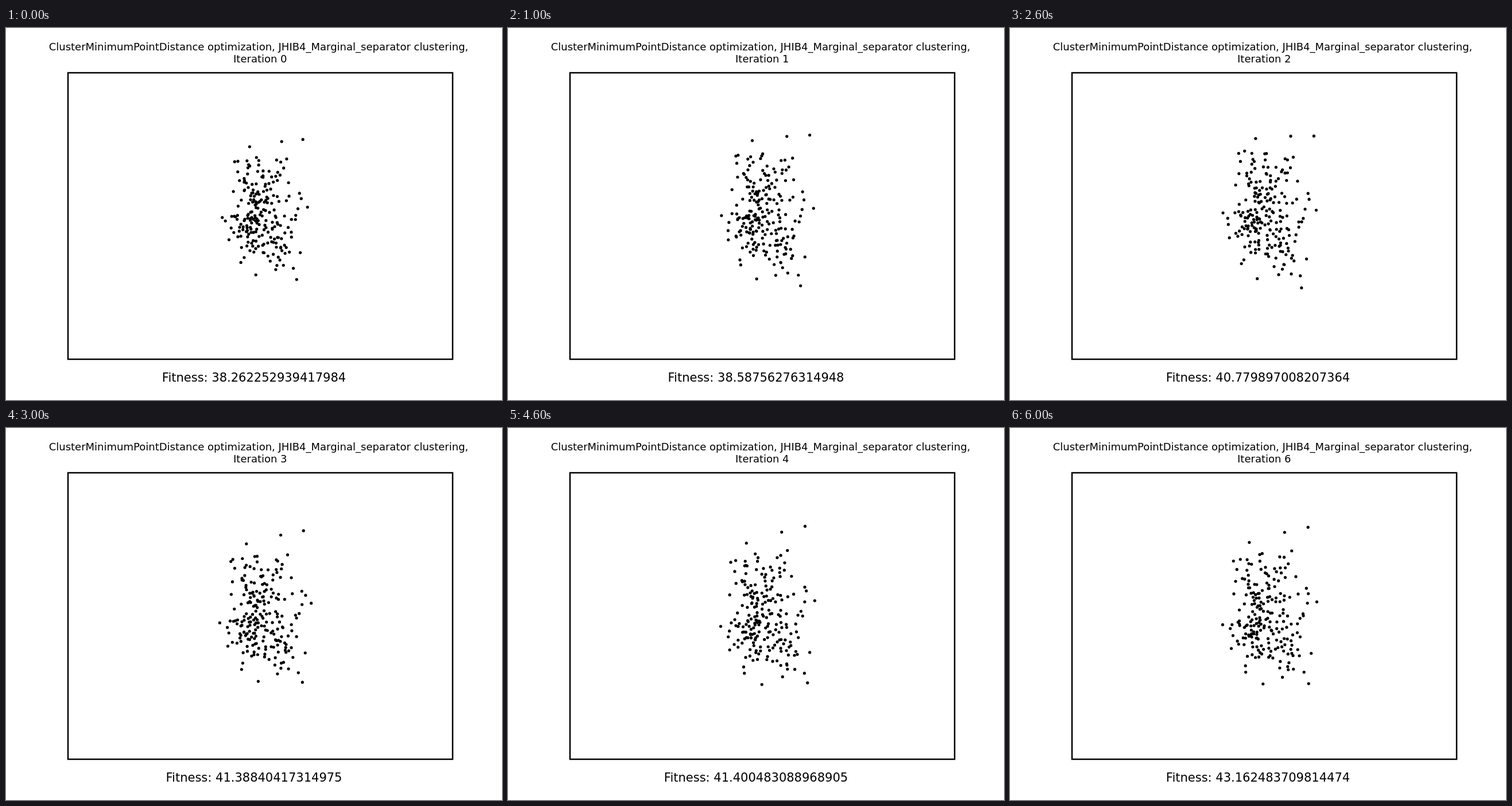
Animation of 864 by 648 pixels, one loop 7 s. Source, as an HTML page with a canvas:

```html
<!DOCTYPE html>
<html lang="en">
<head>
<meta charset="utf-8">
<title>Cluster optimization</title>
<style>
  html, body { margin: 0; width: 864px; height: 648px; overflow: hidden; background: #fff; }
  canvas { display: block; }
</style>
</head>
<body>
<canvas id="stage" width="864" height="648"></canvas>
<script>
const ctx = document.getElementById('stage').getContext('2d');
const STEP = 1000;
const COUNT = 212;
const CENTER = [437, 322];

const steps = [
  { fitness: '38.262252939417984', turn: 0, size: .9 },
  { fitness: '38.58756276314948', turn: .04, size: .97 },
  { fitness: '40.779897008207364', turn: .09, size: .98 },
  { fitness: '41.38840417314975', turn: -.09, size: .97 },
  { fitness: '41.400483088968905', turn: -.15, size: 1 },
  { fitness: '41.86884283091664', turn: 0, size: 1 },
  { fitness: '43.162483709814474', turn: -.12, size: 1 }
];

// Outermost points, clockwise; the rest of the cloud lies inside them
const outline = [
  [423, 194], [485, 184], [526, 180], [535, 311], [521, 399], [514, 451],
  [435, 442], [406, 418], [383, 374], [370, 331], [394, 223]
];

function makeRandom(seed) {
  return () => {
    seed = (seed + 0x6D2B79F5) | 0;
    let t = Math.imul(seed ^ (seed >>> 15), 1 | seed);
    t = (t + Math.imul(t ^ (t >>> 7), 61 | t)) ^ t;
    return ((t ^ (t >>> 14)) >>> 0) / 4294967296;
  };
}

const random = makeRandom(37);
const rayleigh = () => Math.sqrt(-2 * Math.log(1 - random()));
const gauss = () => rayleigh() * Math.cos(2 * Math.PI * random());
const mix = (a, b, t) => a.map((v, i) => v + (b[i] - v) * t);

// Random points, dense at the center and thinning out towards the outline
function makeCloud() {
  const cloud = [...outline];
  while (cloud.length < COUNT) {
    const k = Math.floor(random() * outline.length);
    const edge = mix(outline[k], outline[(k + 1) % outline.length], random());
    const reach = .37 * rayleigh();
    const [x, y] = mix(CENTER, edge, reach);
    const crowded = cloud.some(p => Math.hypot(p[0] - x, p[1] - y) < 3.5);
    if (reach < .97 && !crowded) cloud.push([x, y]);
  }
  return cloud;
}

// Scale and tilt the cloud around its center
function pose([x, y], { turn, size }) {
  const dx = x - CENTER[0], dy = y - CENTER[1];
  return [
    CENTER[0] + size * dx - .4 * turn * dy,
    CENTER[1] + size * dy + turn * (dx - 30)
  ];
}

const cloud = makeCloud();
const poses = steps.map(step => cloud.map((p, i) => {
  const wobble = i < outline.length ? 0 : 2;
  return pose(p, step).map(v => v + wobble * gauss());
}));

function label(text, x, y, size) {
  ctx.font = `${size}px "DejaVu Sans", sans-serif`;
  ctx.fillText(text, x, y);
}

function draw(i) {
  ctx.fillStyle = '#fff';
  ctx.fillRect(0, 0, 864, 648);
  ctx.fillStyle = ctx.strokeStyle = '#000';
  ctx.lineWidth = 2.5;
  ctx.strokeRect(108, 78, 670, 499);
  ctx.textAlign = 'center';
  label('ClusterMinimumPointDistance optimization, JHIB4_Marginal_separator clustering,', 440, 39, 18);
  label(`Iteration ${i}`, 442.8, 60, 18);
  label(`Fitness: ${steps[i].fitness}`, 432, 616, 21);
  ctx.beginPath();
  for (const [x, y] of poses[i]) {
    ctx.moveTo(x + 2.6, y);
    ctx.arc(x, y, 2.6, 0, 2 * Math.PI);
  }
  ctx.fill();
}

const start = performance.now();
let shown = -1;

function tick() {
  const i = Math.floor((performance.now() - start) / STEP) % steps.length;
  if (i !== shown) draw(shown = i);
  requestAnimationFrame(tick);
}
tick();
</script>
</body>
</html>
```
